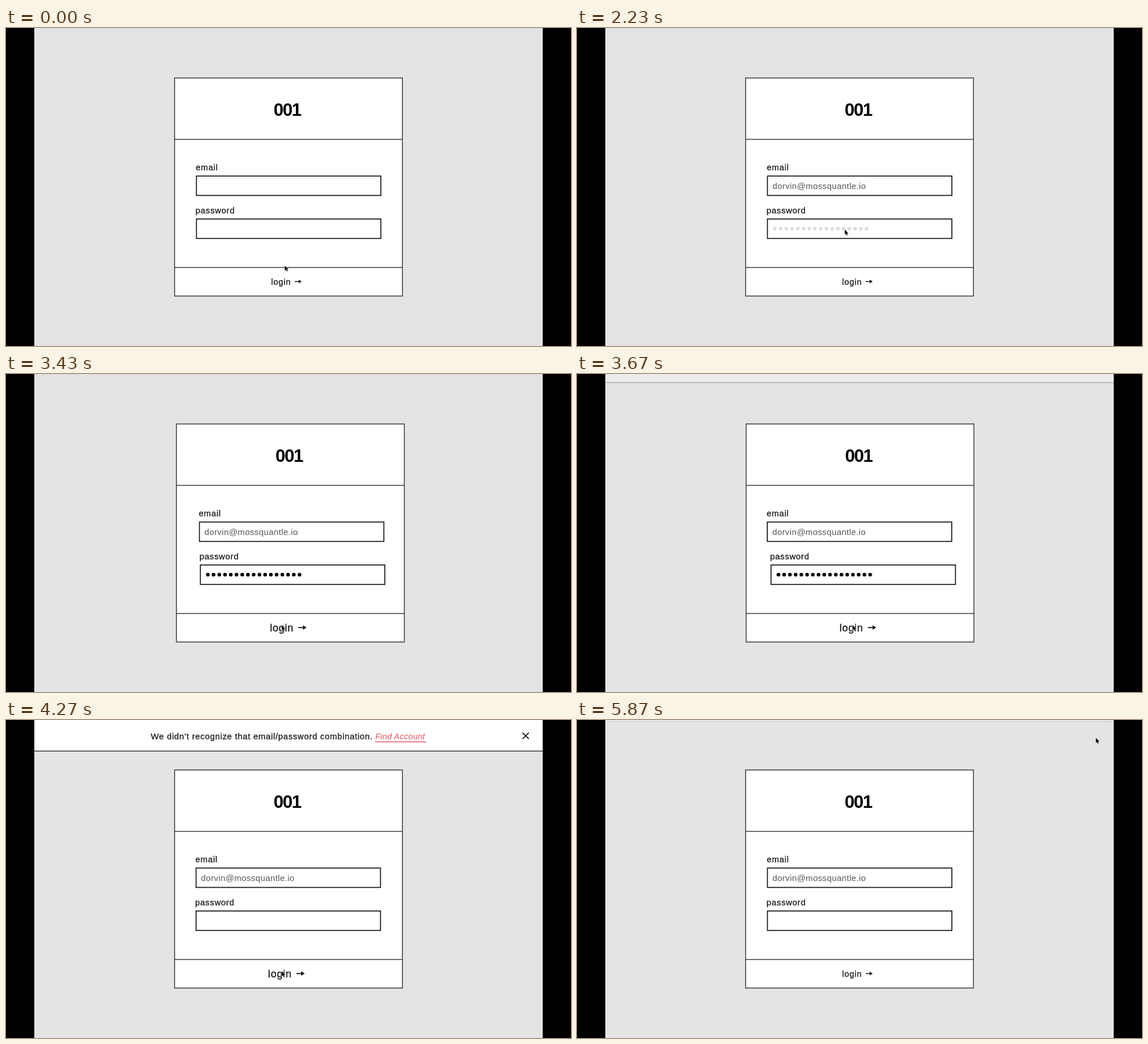
An HTML page for the animation above (7.26 s loop, 998 by 561 pixels).

```html
<!DOCTYPE html>
<html lang="en">
<head>
<meta charset="utf-8">
<title>Login form</title>
<style>
  html, body { margin: 0; width: 100%; height: 100%; overflow: hidden; background: #000; }
  svg { display: block; width: 998px; height: 561px; }

  text { font: 15px "Liberation Sans", Arial, sans-serif; }
  .medium { letter-spacing: .65px; fill: #1a1a1a; stroke: #1a1a1a; stroke-width: .3px; }
  .title { font-size: 31.5px; font-weight: 700; letter-spacing: -1.5px; fill: #000; }
  .value { letter-spacing: .4px; fill: #555; }
  .link { font-style: italic; letter-spacing: .05px; fill: #e0565f; }
  .frame { fill: #fff; stroke: #383838; stroke-width: 1.5px; }
  .field { fill: #fff; stroke: #111; stroke-width: 1.7px; }
  .dots { fill: none; stroke: #000; stroke-width: 6.4px; stroke-linecap: round; stroke-dasharray: 0 10.125; }

  /* Every part shares one 7260 ms loop: 1% = 72.6 ms */
  .anim { animation: 7260ms ease-in-out infinite both; }
  #cursor { animation-name: point; animation-timing-function: cubic-bezier(.65, 0, .35, 1); }
  #card { animation-name: shake-card; }
  #email { animation-name: shake-email; }
  #password { animation-name: shake-password; }
  #address { animation-name: fill-email; animation-timing-function: linear; }
  #secret { animation-name: fill-password; animation-timing-function: linear; }
  #login { animation-name: hover; transform-origin: 495.5px 447.5px; }
  #banner { animation-name: notify; animation-timing-function: linear; }

  @keyframes point {
    0%, .41% { transform: translate(492.5px, 419px); }
    12.4%, 21.9% { transform: translate(474px, 281.8px); }
    27.55%, 38.57% { transform: translate(473px, 355.5px); }
    44.9%, 59.09% { transform: translate(487px, 443px); }
    77.55%, 100% { transform: translate(916.5px, 31.5px); }
  }
  @keyframes shake-card {
    0%, 45.45% { transform: translateX(0); }
    46.35% { transform: translateX(-3px); }
    47.93% { transform: translateX(7px); }
    49.59% { transform: translateX(-5px); }
    51.24% { transform: translateX(4px); }
    52.75% { transform: translateX(-2.5px); }
    54.55% { transform: translateX(1px); }
    58.82%, 100% { transform: translateX(0); }
  }
  @keyframes shake-email {
    0%, 45.32% { transform: translateX(0); }
    46.07% { transform: translateX(-4px); }
    47.45% { transform: translateX(5.6px); }
    49.52% { transform: translateX(-9px); }
    51.58% { transform: translateX(8px); }
    53.65% { transform: translateX(-6px); }
    55.92% { transform: translateX(3px); }
    58.4% { transform: translateX(-.8px); }
    60.6%, 100% { transform: translateX(0); }
  }
  @keyframes shake-password {
    0%, 45.32% { transform: translateX(0); }
    46% { transform: translateX(-4px); }
    47.31% { transform: translateX(7px); }
    49.04% { transform: translateX(-9px); }
    50.83% { transform: translateX(7px); }
    52.48% { transform: translateX(-4.5px); }
    54.27% { transform: translateX(2px); }
    56.47% { transform: translateX(-1.5px); }
    58.82% { transform: translateX(-.7px); }
    60.6%, 100% { transform: translateX(0); }
  }
  @keyframes fill-email {
    0%, 14.74% { opacity: 0; }
    16.94%, 100% { opacity: 1; }
  }
  @keyframes fill-password {
    0%, 30.44% { opacity: 0; }
    32.64%, 52.1% { opacity: 1; }
    54.3%, 100% { opacity: 0; }
  }
  @keyframes hover {
    0%, 41.87% { transform: scale(1); }
    44.63%, 63.36% { transform: scale(1.2); }
    69.4%, 100% { transform: scale(1); }
  }
  @keyframes notify {
    0% { transform: translateY(-55px); opacity: .05; }
    49.587% { transform: translateY(-55px); opacity: .05; animation-timing-function: cubic-bezier(.215, .61, .355, 1); }
    59.229%, 79.477% { transform: translateY(0); opacity: 1; }
    80.854%, 100% { transform: translateY(-51.5px); opacity: .08; }
  }
</style>
</head>
<body>
<svg viewBox="0 0 998 561">
  <rect x="50" width="898" height="561" fill="#e4e4e4"/>

  <g id="card" class="anim">
    <rect class="frame" x="297.8" y="88.2" width="402.5" height="384.6"/>
    <path class="frame" d="M297.8 196.5h402.5M297.8 422.6h402.5"/>
    <text class="title" x="472.7" y="154.6">001</text>
    <g id="login" class="anim">
      <text class="medium" x="468.3" y="452.8">login</text>
      <path d="M510 447.3h8" stroke="#1a1a1a" stroke-width="1.6"/>
      <path d="M517 444l5.3 3.3-5.3 3.3z" fill="#1a1a1a"/>
    </g>
  </g>

  <g id="email" class="anim">
    <text class="medium" x="335.3" y="250.8">email</text>
    <rect class="field" x="336.4" y="261.2" width="325.8" height="34.2"/>
    <text id="address" class="value anim" x="345.2" y="284">dorvin@mossquantle.io</text>
  </g>

  <g id="password" class="anim">
    <text class="medium" x="334.8" y="326.8">password</text>
    <rect class="field" x="336.4" y="336.9" width="325.8" height="34.4"/>
    <path id="secret" class="dots anim" d="M349.5 354h162.1"/>
  </g>

  <g id="banner" class="anim">
    <rect x="50" y="-2" width="898" height="56.5" fill="#fff"/>
    <path d="M50 54.7h898" stroke="#383838" stroke-width="1.5"/>
    <text class="medium" x="255.8" y="34.2">We didn’t recognize that email/password combination.</text>
    <text class="link" x="652.3" y="34.2">Find Account</text>
    <path d="M652 38.6h90" stroke="#e0565f" stroke-width="1.4"/>
    <path d="M912.5 22.5l11 11m0-11l-11 11" stroke="#111" stroke-width="1.8"/>
  </g>

  <g id="cursor" class="anim">
    <path d="M0 0v9.2l2.1-2 1.5 3.3 1.5-.7-1.5-3.1h2.9z" fill="#000" stroke="#fff" stroke-width="1.2" paint-order="stroke"/>
  </g>
</svg>
</body>
</html>
```
